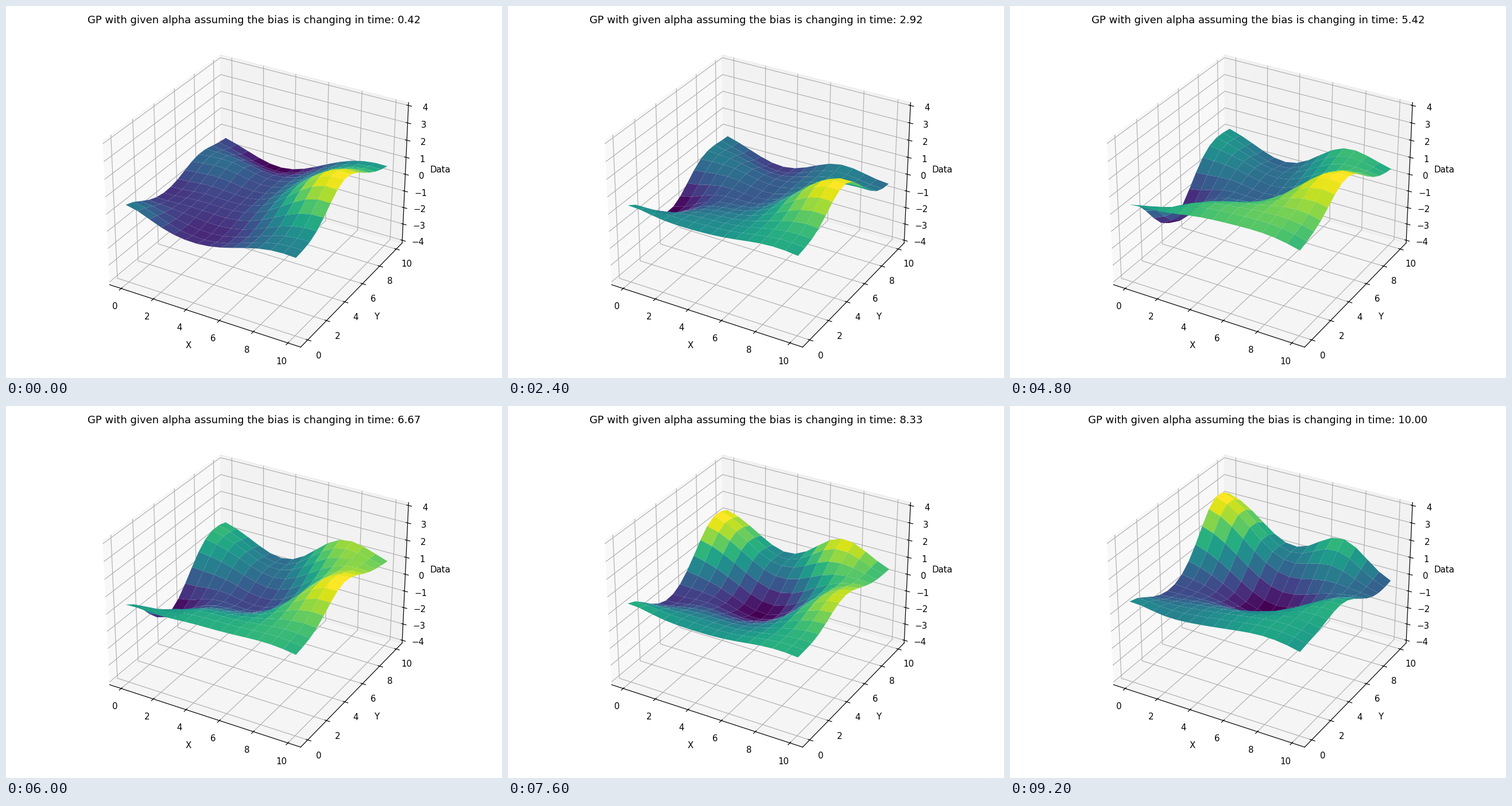
Animation, 864 px wide and 648 px high, one loop 9600 ms. Source, as a matplotlib script:

```python
import numpy as np
import matplotlib.pyplot as plt
from matplotlib.animation import FuncAnimation

W, H, DPI = 864, 648, 108
FRAMES, INTERVAL = 24, 400
END = 10

grid = np.linspace(0, END, 15)
X, Y = np.meshgrid(grid, grid)


def bump(cx, cy, sx, sy):
    return np.exp(-0.5 * (((X - cx) / sx) ** 2 + ((Y - cy) / sy) ** 2))


def wave(t, peak, period):
    return np.cos(2 * np.pi * (t - peak) / period)


def heights(t):
    """Sum of smooth hills and dips whose strengths drift and oscillate."""
    s = t / END
    swell = np.sin(np.pi * s) ** 2
    right_ridge = (2.4 - 0.9 * s + 0.6 * swell) * bump(9.3, 5, 2.2, 2)
    left_dip = -(0.55 + 2 * swell) * bump(-0.2, 3.8, 1.6, 1.9)
    valley = -(0.5 + 1.7 * s) * bump(5.3, 5.9, 2.6, 1.9)
    front = (-0.55 + 0.7 * s + 0.8 * swell) * bump(3.9, 0.8, 2.2, 1.4)
    front_corners = 0.6 * bump(0, 0, 1.3, 1.3) + 0.5 * bump(8.5, 0, 2, 1.5)
    left_ridge = (0.5 - 0.8 * s) * bump(2, 7, 1.6, 1.3)
    back_trough = -1.2 * bump(3.5, 10, 2.2, 1.4)
    back_peak = 3.2 * s ** 2.5 * bump(0.3, 8.9, 3, 2)
    back_hill = 2.1 * s * bump(7, 10.5, 1.6, 2)
    fast = 0.75 * wave(t, 1.8, 3.9) * bump(6.5, 2.2, 3, 2.5)
    slow = 0.7 * wave(t, 6.8, 7) * bump(9.5, 9, 2.2, 2.5)
    return (right_ridge + left_dip + valley + front + front_corners
            + left_ridge + back_trough + back_peak + back_hill + fast + slow)


fig = plt.figure(figsize=(W / DPI, H / DPI), dpi=DPI)
side = 592.4
ax = fig.add_axes([(W - side) / 2 / W, 16.4 / H, side / W, side / H],
                  projection="3d")
pad = 0.5 + 11 / 48
ax.set_xlim(-pad, END + pad)
ax.set_ylim(-pad, END + pad)
ax.set_zlim(-4 - 1 / 6, 4 + 1 / 6)
ax.set_xticks(range(0, 11, 2))
ax.set_yticks(range(0, 11, 2))
ax.set_zticks(range(-4, 5))
ax.set_xlabel("X")
ax.set_ylabel("Y")
ax.set_zlabel("Data")
title = fig.suptitle("", y=0.975, fontsize=12)

surface = None


def draw(frame):
    global surface
    if surface is not None:
        surface.remove()
    t = END * (frame + 1) / FRAMES
    surface = ax.plot_surface(X, Y, heights(t), cmap="viridis", linewidth=0)
    title.set_text("GP with given alpha assuming the bias is changing "
                   f"in time: {t:.2f}")
    return [surface, title]


anim = FuncAnimation(fig, draw, frames=FRAMES, interval=INTERVAL,
                     init_func=lambda: [], repeat=True)
plt.show()
```
